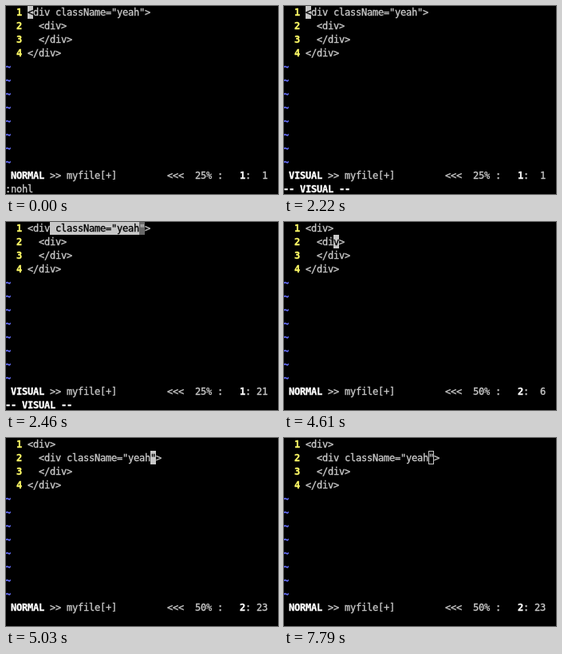
An HTML page for the animation above (7.87 s loop, 341 by 235 pixels).

```html
<!DOCTYPE html>
<html lang="en">
<head>
<meta charset="utf-8">
<title>Moving an attribute in an editor</title>
<style>
  html, body { margin: 0; width: 100%; height: 100%; overflow: hidden; background: #000; }
  svg { display: block; width: 100%; height: 100%; }
  /* The thin stroke gives the heavier look of smoothed terminal text. */
  text { font: 12px "DejaVu Sans Mono", "Liberation Mono", monospace; white-space: pre; stroke-width: .35px; }
  .bold { font-weight: bold; }
</style>
</head>
<body>
<svg id="screen" viewBox="0 0 341 235"></svg>
<script>
const LOOP = 7870, CELL_W = 7, CELL_H = 17, GUTTER = 4;
const FG = '#c7c7c7', BLACK = '#000', WHITE = '#fff', YELLOW = '#fffb67', BLUE = '#6871ff', DIM = '#686868';
const ATTR = ' className="yeah"';
const screen = document.getElementById('screen');

// Each step holds until the next one starts.
const steps = [
  { at: 0,    row: 1, col: 1,  attrRow: 1, cmd: ':nohl' },
  { at: 2220, row: 1, col: 1,  attrRow: 1, cmd: '-- VISUAL --', visual: true },
  { at: 2460, row: 1, col: 21, attrRow: 1, cmd: '-- VISUAL --', visual: true, from: 5 },
  { at: 3300, row: 1, col: 5 },
  { at: 4140, row: 2, col: 5 },
  { at: 4610, row: 2, col: 6 },
  { at: 5030, row: 2, col: 23, attrRow: 2 },
  { at: 7790, row: 2, col: 23, attrRow: 2, hollow: true }
];

const cellX = col => col * CELL_W - 1;
const cellY = row => row * CELL_H - 1;

function add(name, attrs, content = '') {
  const node = document.createElementNS('http://www.w3.org/2000/svg', name);
  for (const key in attrs) node.setAttribute(key, attrs[key]);
  node.textContent = content;
  screen.append(node);
}

// Terminal text: every character sits on the cell grid.
function put(row, col, str, fill = FG, bold = false) {
  const x = [...str].map((_, i) => cellX(col + i)).join(' ');
  add('text', { x, y: cellY(row) + 13, fill, stroke: fill, class: bold ? 'bold' : '' }, str);
}

function block(row, col, str, back, fore) {
  add('rect', { x: cellX(col), y: cellY(row), width: str.length * CELL_W, height: CELL_H, fill: back });
  put(row, col, str, fore);
}

function draw(s) {
  screen.replaceChildren();
  const attr = row => s.attrRow === row ? ATTR : '';
  const lines = [`<div${attr(1)}>`, `  <div${attr(2)}>`, '  </div>', '</div>'];
  lines.forEach((line, i) => {
    put(i, 2, String(i + 1), YELLOW, true);
    put(i, GUTTER, line);
  });
  for (let row = lines.length; row < 12; row++) put(row, 0, '~', BLUE, true);

  const row = s.row - 1, line = lines[row], col = s.col - 1;
  if (s.from) block(row, GUTTER + s.from - 1, line.slice(s.from - 1, col), FG, BLACK);
  if (s.hollow) {
    add('rect', { x: cellX(GUTTER + col) + .5, y: cellY(row) + .5, width: CELL_W - 1, height: CELL_H - 1,
                  fill: 'none', stroke: FG });
  } else {
    block(row, GUTTER + col, line[col], s.from ? DIM : FG, s.from ? FG : BLACK);
  }

  put(12, 1, s.visual ? 'VISUAL' : 'NORMAL', WHITE, true);
  put(12, 8, '>> myfile[+]');
  put(12, 29, '<<<');
  put(12, 34, `${s.row * 25}% :`);
  put(12, 42, String(s.row), WHITE, true);
  put(12, 43, ':');
  put(12, 45, String(s.col).padStart(2));
  if (s.cmd) put(13, 0, s.cmd, s.visual ? WHITE : FG, s.visual);
}

let shown, start;
function tick(now) {
  start ??= now;
  const t = (now - start) % LOOP;
  const step = steps.findLast(s => s.at <= t) || steps[0];
  if (step !== shown) draw(shown = step);
  requestAnimationFrame(tick);
}
draw(shown = steps[0]);
requestAnimationFrame(tick);
</script>
</body>
</html>
```
